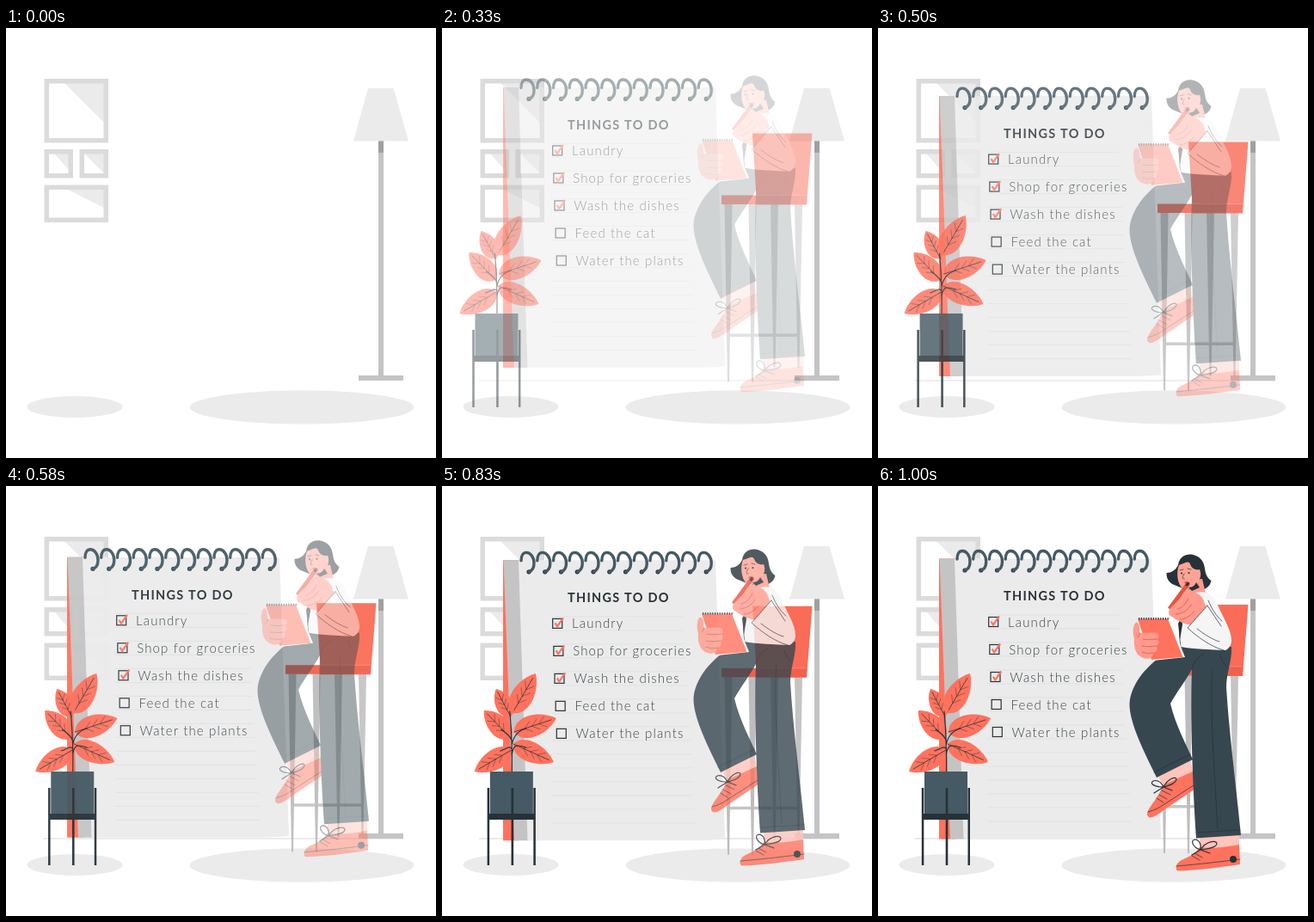
An HTML page that plays this animation: 500x500 px, repeating every 1.04 s.

```html
<!DOCTYPE html>
<html lang="en">
<head>
<meta charset="utf-8">
<title>Things to do</title>
<style>
  html, body { margin: 0; width: 100%; height: 100%; overflow: hidden; background: #fff; }
  svg { display: block; width: 100vw; height: 100vh; }
  text { font-family: Lato, "Open Sans", sans-serif; fill: #263238; }
  .title { font-size: 14.5px; font-weight: 700; letter-spacing: 1.3px; }
  .item { font-size: 15px; font-weight: 300; letter-spacing: 1.15px; fill-opacity: .9; }
  .thin { fill: none; stroke: #263238; stroke-width: .7; stroke-linecap: round; stroke-linejoin: round; }
</style>
</head>
<body>
<svg viewBox="0 0 500 500">
  <g id="room">
    <ellipse cx="80" cy="440.5" rx="55.5" ry="12.5" fill="#ebebeb"/>
    <ellipse cx="344" cy="441" rx="130.5" ry="19.5" fill="#ebebeb"/>
    <g id="pictures"></g>
    <path d="M421 70H450.500L468 131.500H404Z" fill="#ebebeb"/>
    <path d="M433 131.500h6V404h23v6h-52v-6h23Z" fill="#c4c4c4"/>
    <path d="M433 131.500h6V145h-6Z" fill="#a0a0a0"/>
  </g>

  <path id="floor" d="M43 410H462" stroke="#c4c4c4" stroke-width=".7"/>

  <g id="pad">
    <path d="M71 84.500H90V410.500H71Z" fill="#ff725e"/>
    <path d="M71.500 84.500H92L101 410.500H84Z" fill="#c4c4c4"/>
    <path d="M89 84.500H318L329 409L301 410.500H99.500Z" fill="#ebebeb"/>
    <g id="rules" stroke="#dbdbdb" stroke-width=".7"></g>
    <g id="rings" fill="none" stroke="#455a64" stroke-width="3.4" stroke-linecap="round"></g>
    <text class="title" x="146" y="133.300">THINGS TO DO</text>
    <g id="items"></g>
  </g>

  <g id="plant">
    <g id="leaves"></g>
    <path d="M79.500 333C80 305 79 285 77 262M79.500 312C81 298 88 302 96 304M79.500 306C78 301 72 306 66 308M79.500 300C82 289 88 284 96 282M79.500 297C78 290 72 287 67 283" class="thin" style="stroke-width:1.200"/>
    <path d="M54 332H104V382H54Z" fill="#455a64"/>
    <path d="M50.800 351h2.500v30h51.200v-30h2.500v90h-2.500v-53H81.300v53h-2.600v-53H53.300v53h-2.500Z" fill="#263238"/>
    <path d="M78.700 351h2.600V382h-2.600Z" fill="#263238"/>
  </g>

  <g id="stool">
    <path d="M382 220h9l-3.500 190h-2ZM410 220h9l-3.500 190h-2Z" fill="#c4c4c4"/>
    <path d="M335 371H415V374.500H335Z" fill="#c4c4c4"/>
    <path d="M328.500 220h9l-3.500 207h-2ZM356.500 220h9l-3.500 207h-2Z" fill="#bdbdbd"/>
    <path d="M361 138H430.500L424 221H366Z" fill="#fa6c57"/>
    <path d="M325 210H424V220.500H325Z" fill="#f0604c"/>
    <path d="M366 210H424" stroke="#ff8d7d" stroke-width=".8"/>
  </g>

  <g id="person">
    <!-- far shoe, near shoe -->
    <path d="M326 338L363 319L367 336L332 352Z" fill="#ffc4ba"/>
    <path d="M331 348L366 332C368.500 340 369 348 367.500 353L332 377C321 386 314 388 313 382C313 374 326 364 331 348Z" fill="#ff725e"/>
    <path d="M314 379C322 377 327 374 333 370L367 348M330 354l10 5M327 359l9 5M324 363l8 5" class="thin"/>
    <path d="M331 350C322 350 315 346 320 343C326 341 330 346 332 350C337 340 347 337 347 341C346 346 339 348 332 350L321 357M332 350L342 354" class="thin" style="stroke-width:1.200"/>
    <path d="M374 405L420 402L420 422L374 424Z" fill="#ffc4ba"/>
    <path d="M374 420C388 422 404 420 420 417L421 440C400 443 372 447 348 447.500C345 444 347 438 353 435C362 431 369 428 374 420Z" fill="#ff725e"/>
    <path d="M347 442C372 440 397 437 421 434M368 427l9 5M365 430l9 5" class="thin"/>
    <circle cx="413" cy="434" r="4" fill="#263238"/>
    <path d="M375 423C365 420 363 411 369 411C375 412 376 419 375 423C381 413 394 411 394 416C393 421 382 422 375 423L365 429M375 423L386 427" class="thin" style="stroke-width:1.200"/>

    <!-- trousers -->
    <path d="M353 186L411 187C412 202 405 218 405 234C408 285 416 345 422 406L370 409.500C366 350 363 270 365 213C357 228 347 240 340 253C346 278 358 300 366 318L324 339C311 312 292 276 292.500 253C294 231 311 211 328 199Z" fill="#37474f"/>
    <path d="M365 213C367 204 372 199 379 195M321 333L363 312M370 403L421 400M389 215C386 245 389 300 395 398M406 210C402 207 399 202 398 197" class="thin"/>

    <!-- head -->
    <path d="M349 92C350 83 357 79 364 79.500C374 81 379 87 380 96C381 104 384 108 387.500 110C386 119 377 122 367 122C358 120 351 118 347 116C340 114 335 109 335.500 101C341 101 346 98 349 92Z" fill="#263238"/>
    <path d="M364 109L377 108L381 125L371 133L360 128Z" fill="#ff9a8c"/>
    <path d="M350 92C357 90 361 86 363 91C365 97 371 98 374 97C377 104 374 111 369 113C366 119 360 122 354 119C349 115 346 102 350 92Z" fill="#ffa396"/>
    <path d="M351 98l4-1M360 96l4 1M356 102C354 106 353 108 356 108" class="thin"/>
    <circle cx="353" cy="101.500" r="1.100" fill="#263238"/>
    <circle cx="361.500" cy="101" r="1.100" fill="#263238"/>
    <path d="M356 112C359 110 362 111 363 113C361 115 358 115 356 112Z" fill="#e14d3d"/>
    <path d="M361 118C366 118 369 115 370 112L374 118L365 122Z" fill="#263238"/>

    <!-- shirt -->
    <path d="M369 124C383 121 391 127 397 143C403 156 411 168 411 180C411 185 408 189 404 191C386 190 368 190 352 187C348 172 350 150 357 130Z" fill="#f5f5f5"/>
    <path d="M384 133C388 143 393 151 400 157M362 165C375 176 390 186 403 191M353 150C350 162 350 176 352 187" class="thin"/>
    <path d="M349 160l4-8l1 9l-3 18Z" fill="#263238"/>

    <!-- held notebook -->
    <path d="M302 154.500H339L357 199L320 203Z" fill="#fff"/>
    <path d="M302 154.500H337L354.500 199L318 202Z" fill="#ff725e"/>
    <path d="M303 154.300H338" stroke="#263238" stroke-width="2.500" stroke-dasharray="1.200 1.600"/>
    <path d="M300 158.500C304 158 304 165 304.500 171C311 171 318 170 324 171C328 173 327 177 324 178C328 180 327 185 323 186C326 188 325 193 320 194C321 198 316 202 310 200.500C300 198 297 188 298 178C296 170 296 162 300 158.500Z" fill="#ff9a8c"/>
    <path d="M308 178C314 179 319 179 324 178M307 186C312 187 318 187 323 186M307 193C312 195 316 195 320 194M304.500 171C304.500 173 303 175 302 176" class="thin" style="stroke:#c9574a"/>

    <!-- raised hand with pencil -->
    <path d="M339 143L361 113" stroke="#e9533f" stroke-width="5"/>
    <path d="M358.500 116L361 112.500" stroke="#263238" stroke-width="3"/>
    <path d="M338 147C338 141 349 135 353 128C356 121 361 119 365 123C373 124 378 129 380 137L384 145L366 162C357 161 348 157 342 152C339 151 338 149 338 147Z" fill="#ff9a8c"/>
    <path d="M348 143C354 142 358 137 361 131M346 149C353 149 360 145 364 138M351 155C358 155 363 151 367 146" class="thin" style="stroke:#c9574a"/>
    <path d="M383 139L397 156L407 171C412 181 408 190 402 191C388 187 373 177 360 165Z" fill="#f5f5f5"/>
    <path d="M383 139L360 165C373 177 388 187 402 191M383 139L399 163M371 166C380 173 390 179 397 181" class="thin"/>
  </g>
</svg>
<script>
const PERIOD = 1040, FPS = 24, TRAVEL = 30;
const el = id => document.getElementById(id);
const fill = (id, count, draw) =>
  el(id).innerHTML = Array.from({ length: count }, (_, i) => draw(i)).join("");

// x, y, width, height, then where the glass reflection starts and ends
const pictures = [
  [44.5, 59, 74.5, 74.5, 68, 110],
  [44.5, 141, 33.5, 33.5, 56, 165],
  [85.5, 141, 33.5, 33.5, 91, 169],
  [44.5, 182.5, 74.5, 43.5, 71, 209]
];
fill("pictures", pictures.length, i => {
  const [x, y, w, h, from, to] = pictures[i];
  return `<path d="M${from} ${y + 5}H${x + w - 5}V${to}Z" fill="#ebebeb"/>
    <rect x="${x + 2.75}" y="${y + 2.75}" width="${w - 5.5}" height="${h - 5.5}"
      fill="none" stroke="#dbdbdb" stroke-width="5.500"/>`;
});

fill("rules", 16, i => {
  const y = 150 + 16 * i;
  return `<path d="M127 ${y}H${280 + i}"/>`;
});

fill("rings", 12, i => `<g transform="translate(${18.75 * i} 0)">
  <circle cx="101" cy="98" r="1.600" fill="#263238" stroke="#263238" stroke-width="2"/>
  <path d="M92 85C92 79 94.500 75.500 98 75.500C103 75.500 107 81 107 88C107 93.500 104.500 97 101 98"/></g>`);

const items = ["Laundry", "Shop for groceries", "Wash the dishes", "Feed the cat", "Water the plants"];
fill("items", items.length, i => {
  const tick = i < 3
    ? `<path d="M131.500 157.500L134 161.500L141 151.500" fill="none" stroke="#ff725e" stroke-width="2.200"/>` : "";
  return `<g transform="translate(${1.15 * i} ${32 * i})">
    <rect x="128.700" y="152.500" width="11" height="11" fill="none" stroke="#263238" stroke-width="1.200"/>
    ${tick}<text class="item" x="151" y="163.500">${items[i]}</text></g>`;
});

// base x, base y, tip x, tip y, half width
const leaves = [
  [80, 264, 107, 218, 15], [78, 268, 61, 236, 12], [78, 293, 47, 261, 14],
  [82, 286, 131, 270, 15], [81, 300, 128, 321, 14], [79, 307, 36, 332, 14]
];
fill("leaves", leaves.length, i => {
  const [x, y, tipX, tipY, w] = leaves[i];
  const len = Math.hypot(tipX - x, tipY - y);
  const angle = Math.atan2(tipY - y, tipX - x) * 180 / Math.PI;
  const veins = [.25, .42, .59].map(k =>
    `M${(k + .15) * len} ${-w * .4}L${k * len} 0L${(k + .15) * len} ${w * .4}`).join("");
  return `<g transform="translate(${x} ${y}) rotate(${angle})">
    <path d="M0 0C${.12 * len} ${-w * 1.25} ${.72 * len} ${-w} ${len} 0C${.72 * len} ${w} ${.12 * len} ${w * 1.25} 0 0Z" fill="#ff725e"/>
    <path d="M0 0H${.88 * len}" class="thin"/>
    <path d="${veins}" class="thin" style="stroke-width:.4"/></g>`;
});

function bezier(x1, y1, x2, y2) {
  const at = (a, b, s) => 3 * (1 - s) ** 2 * s * a + 3 * (1 - s) * s * s * b + s ** 3;
  return x => {
    if (x >= 1) return 1;
    let lo = 0, hi = 1;
    for (let i = 0; i < 30; i++) {
      const mid = (lo + hi) / 2;
      if (at(x1, x2, mid) < x) lo = mid; else hi = mid;
    }
    return at(y1, y2, lo);
  };
}
const overshoot = bezier(.36, -.01, .5, 1.38);
const easeIn = bezier(.42, 0, 1, 1);

function place(id, progress, dx, dy) {
  const rest = TRAVEL * (progress - 1);
  el(id).setAttribute("transform", `translate(${dx * rest} ${dy * rest})`);
  el(id).setAttribute("opacity", Math.max(0, Math.min(1, progress)));
}

function render(ms) {
  const step = Math.floor((ms + 3.5) * FPS / 1000);
  const time = step < 2 ? 0 : (step + 1) / FPS;
  const main = overshoot(time);
  place("floor", main, 0, 0);
  place("pad", main, 0, 1);
  place("stool", main, 0, 1);
  place("plant", main, 1, 0);
  place("person", easeIn(time), 0, 1);
}

const start = performance.now();
function loop() {
  render((performance.now() - start) % PERIOD);
  requestAnimationFrame(loop);
}
loop();
</script>
</body>
</html>
```
